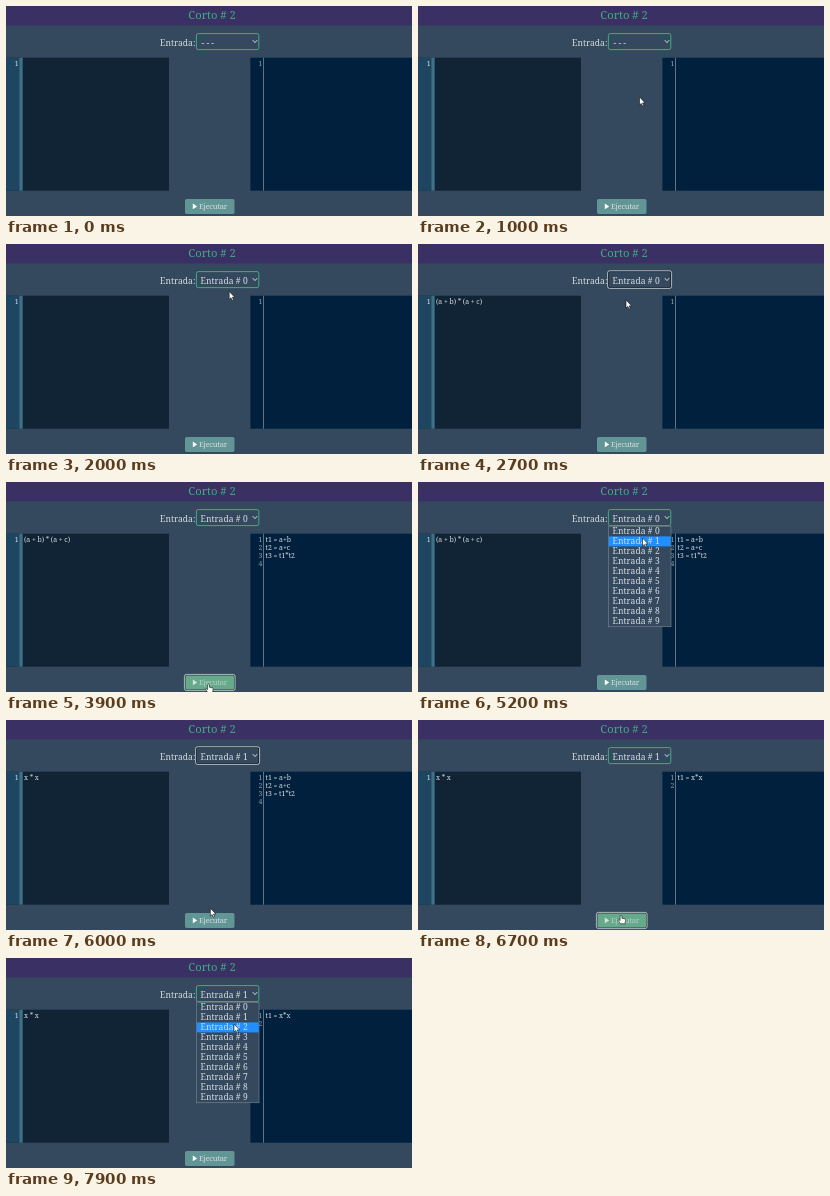
An HTML page that plays this animation: 406 by 210 pixels, repeating every 8 s.

```html
<!DOCTYPE html>
<html lang="es">
<head>
<meta charset="utf-8">
<title>Corto # 2</title>
<style>
  html, body { margin: 0; width: 100%; height: 100%; overflow: hidden; background: #34495e; }
  svg { display: block; width: 100vw; height: 100vh; }
  text { font-family: "Noto Serif", "Liberation Serif", serif; font-weight: 200; fill: #d6dce1; white-space: pre; }
  .title { font-size: 11.2px; fill: #40ac80; text-anchor: middle; }
  .ui { font-size: 8.5px; letter-spacing: .08px; }
  .dash { font-family: "Noto Sans Mono", monospace; font-size: 8px; }
  .button { font-size: 7.6px; letter-spacing: -.25px; }
  .code { font-size: 6.9px; letter-spacing: -.05px; }
  .num { text-anchor: end; }
  .right .num { fill: #8f9fac; }
  .ring { fill: none; stroke: #e4e8e8; stroke-width: .7; }
</style>
</head>
<body>
<svg viewBox="0 0 406 210" preserveAspectRatio="none">
  <rect width="406" height="210" fill="#34495e"/>
  <rect width="406" height="19.5" fill="#3a3064"/>
  <text class="title" x="206" y="13.2">Corto # 2</text>
  <text class="ui" x="154" y="39.5" textLength="">Entrada:</text>

  <rect y="51.7" width="163" height="133" fill="#112435"/>
  <rect y="51.7" width="13.3" height="133" fill="#1f4661"/>
  <rect x="13.3" y="51.7" width="3.4" height="133" fill="#3e7087"/>
  <text class="code num" x="12.6" y="60.4">1</text>
  <text class="code" id="source" x="18" y="60.4"></text>

  <rect x="244.4" y="51.7" width="161.6" height="133" fill="#00203d"/>
  <rect x="257" y="51.7" width="1" height="133" fill="#5f7383"/>
  <g class="right" id="output"></g>

  <rect id="selectBox" x="190.4" y="27.6" width="62.4" height="16" rx="1.8" fill="#34495e"/>
  <rect id="selectRing" class="ring" x="189.6" y="26.8" width="64" height="17.6" rx="2"/>
  <text id="value" x="194.6"></text>
  <path d="M246.8 34.2l2.2 2.4 2.2-2.4" fill="none" stroke="#d6dce1"/>

  <rect id="buttonBox" x="179" y="193" width="49.5" height="15" rx="1.8"/>
  <rect id="buttonRing" class="ring" x="178.4" y="192.4" width="50.7" height="16.2" rx="2"/>
  <g id="buttonLabel">
    <path d="M186.8 197.6v5.6l4.4-2.8z" fill="#fff"/>
    <text class="button" x="193" y="203.4">Ejecutar</text>
  </g>

  <g id="list">
    <rect x="190.5" y="44.3" width="62.5" height="100.4" fill="#34495e" stroke="#6f7f8d" stroke-width=".7"/>
    <rect id="marker" x="190.8" width="61.9" height="10" fill="#1e90ff"/>
    <g id="options"></g>
  </g>

  <g id="cursor" stroke="#111" stroke-width=".6" stroke-linejoin="round" fill="#fff">
    <path id="arrow" d="M0 0V8L1.8 6.4 3 9 4.3 8.4 3.1 5.9H5.6Z"/>
    <path id="hand" d="M-.9.8Q0-.6.9.8V3.2L4 3.9Q4.8 4.2 4.6 5.4L4 8.8H-.5L-2.8 5.6Q-3 4.4-1.9 4.8L-.9 5.6Z"/>
  </g>
</svg>
<script>
const LOOP = 8000, STEP = 100, LIST_TOP = 44.4, ROW = 10;
const $ = id => document.getElementById(id);
const show = (id, on) => $(id).setAttribute("visibility", on ? "inherit" : "hidden");
const label = (cls, x, y, str) => `<text class="${cls}" x="${x}" y="${y}">${str}</text>`;

const programs = [
  { source: "(a + b) * (a + c)", code: ["t1 = a+b", "t2 = a+c", "t3 = t1*t2", ""] },
  { source: "x * x", code: ["t1 = x*x", ""] }
];

// What the user does, and which entry it concerns
const actions = [
  { at: 1400, type: "open" },
  { at: 2000, type: "pick", entry: 0 },
  { at: 2700, type: "load", entry: 0 },
  { at: 3500, type: "run", entry: 0 },
  { at: 4800, type: "open" },
  { at: 5400, type: "pick", entry: 1 },
  { at: 5700, type: "load", entry: 1 },
  { at: 6300, type: "run", entry: 1 },
  { at: 7500, type: "open" }
];
const last = (t, type) => actions.filter(a => a.at <= t && (!type || a.type === type)).pop() || {};

// Places where the pointer rests or turns, and when it gets there
const select = { x: 226, y: 38 }, button = { x: 203, y: 197 };
const stops = [
  { at: 300, x: 262, y: 206 },
  { at: 1000, x: 221.5, y: 91 },
  { at: 1300, ...select },
  { at: 1700, x: 225, y: 48 },
  { at: 2500, x: 222, y: 47 },
  { at: 2700, x: 208, y: 56 },
  { at: 3400, x: 202.5, y: 202 },
  { at: 4000, x: 202.5, y: 202 },
  { at: 4700, ...select },
  { at: 5200, x: 224.5, y: 56 },
  { at: 5400, x: 224.5, y: 56 },
  { at: 6200, ...button },
  { at: 6700, x: 203, y: 195 },
  { at: 7300, ...select },
  { at: 7500, ...select },
  { at: 7900, x: 228, y: 66 }
];
const easeOut = k => k * (2 - k);

function pointerAt(t) {
  const i = Math.max(1, stops.findIndex(s => s.at >= t));
  const a = stops[i - 1], b = stops[i];
  const k = easeOut(Math.max(0, (t - a.at) / (b.at - a.at)));
  return { x: a.x + (b.x - a.x) * k, y: a.y + (b.y - a.y) * k };
}

$("options").innerHTML = Array.from({ length: 10 }, (_, i) =>
  label("ui", 194.6, LIST_TOP + ROW * i + 8, "Entrada # " + i)).join("");

function drawSelect(t, y) {
  const entry = last(t, "pick").entry ?? -1;
  const open = last(t).type === "open";
  const focus = ["pick", "load"].includes(last(t - STEP).type) && last(t).type !== "run";
  const value = $("value"), box = $("selectBox");
  value.textContent = entry < 0 ? "---" : "Entrada # " + entry;
  value.setAttribute("class", entry < 0 ? "dash" : "ui");
  value.setAttribute("y", 39.5);
  box.setAttribute("stroke", focus ? "#18202a" : "#40ac80");
  show("selectRing", focus);
  show("list", open);
  const row = y >= LIST_TOP ? Math.floor((y - LIST_TOP) / ROW) : entry;
  show("marker", open && row >= 0);
  $("marker").setAttribute("y", LIST_TOP + ROW * row);
}

function drawButton(t, hover) {
  const focus = last(t).type === "run";
  $("buttonBox").setAttribute("fill", hover ? "#66aa8b" : "#629595");
  $("buttonBox").setAttribute("stroke", focus ? "#2a3f40" : "none");
  $("buttonLabel").setAttribute("opacity", hover ? .7 : 1);
  show("buttonRing", focus);
}

function drawCode(t) {
  const loaded = programs[last(t, "load").entry], ran = programs[last(t - STEP, "run").entry];
  $("source").textContent = loaded ? loaded.source : "";
  $("output").innerHTML = (ran ? ran.code : [""]).map((line, i) => {
    const y = 60.4 + 8 * i;
    return label("code num", 256.4, y, i + 1) + label("code", 259.6, y, line);
  }).join("");
}

let shown = -1;
function render(now) {
  const t = Math.floor((now % LOOP) / STEP) * STEP;
  if (t === shown) return;
  shown = t;
  const { x, y } = pointerAt(t), visible = t >= stops[0].at;
  const hover = visible && x > 179 && x < 228 && y > 193 && y < 208;
  drawSelect(t, y);
  drawButton(t, hover);
  drawCode(t);
  $("cursor").setAttribute("transform", `translate(${x} ${y})`);
  show("arrow", visible && !hover);
  show("hand", hover);
}

const start = performance.now();
function tick() {
  render(performance.now() - start);
  requestAnimationFrame(tick);
}
tick();
</script>
</body>
</html>
```
